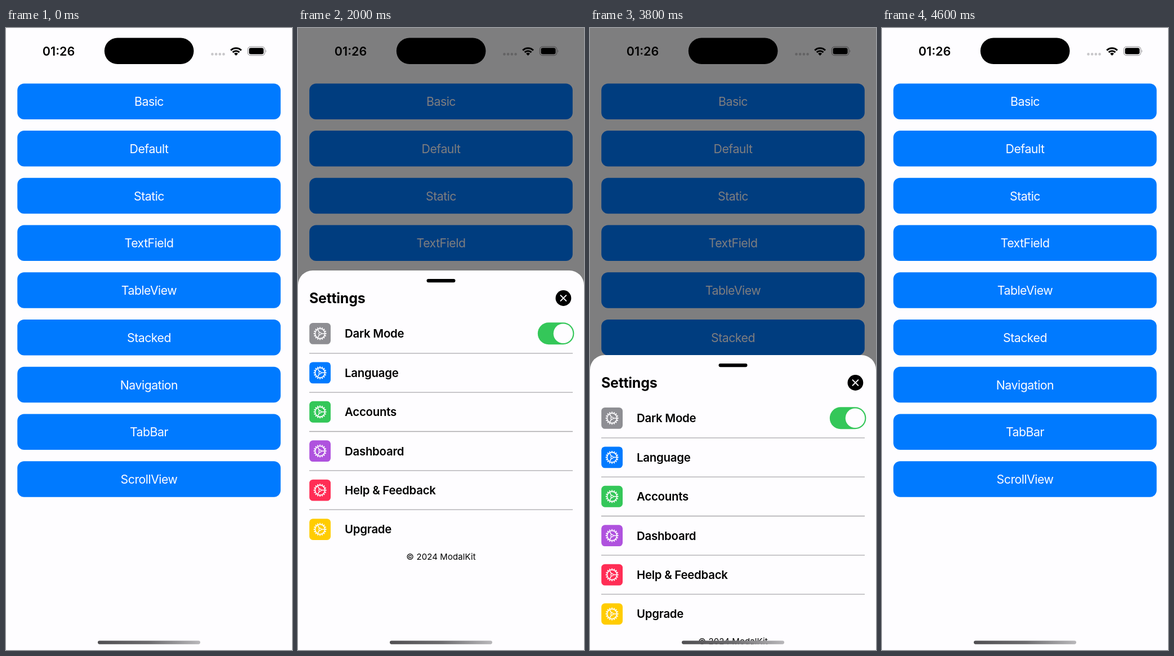
Recreate the animation shown at these times as an HTML page. Size 508 by 1103 pixels, loop 4.7 s.

```html
<!DOCTYPE html>
<html lang="en">
<head>
<meta charset="utf-8">
<title>Settings sheet</title>
<style>
html, body { margin: 0; width: 100%; height: 100%; overflow: hidden; background: #fefdff; }
svg { display: block; width: 508px; height: 1103px; font-family: Inter, "Open Sans", sans-serif; }
.button { font-size: 21.3px; letter-spacing: -.5px; fill: #fefdff; text-anchor: middle; }
.clock { font-size: 21.5px; font-weight: 600; text-anchor: middle; }
.title { font-size: 25px; font-weight: 700; letter-spacing: -.25px; }
.row { font-size: 20.4px; font-weight: 600; letter-spacing: -.25px; }
.footer { font-size: 15px; letter-spacing: .1px; text-anchor: middle; }
</style>
</head>
<body>
<svg viewBox="0 0 508 1103">
  <defs>
    <linearGradient id="bar">
      <stop offset="0" stop-color="#504f52"/>
      <stop offset=".5" stop-color="#6c6b6e"/>
      <stop offset="1" stop-color="#b9b8bb"/>
    </linearGradient>
    <g id="gear" fill="none" stroke="#fefdff">
      <circle r="8.7" stroke-width="1.7"/>
      <circle r="10.3" stroke-width="2.2" pathLength="160" stroke-dasharray="5 5" stroke-dashoffset="2.5"/>
      <circle r="2.1" stroke-width="1.3"/>
      <path id="spokes" stroke-width="1.5"/>
    </g>
  </defs>

  <rect width="508" height="1103" fill="#fefdff"/>
  <g id="buttons"></g>

  <text class="clock" x="93.5" y="48.8">01:26</text>
  <g id="dots" fill="#c8c7ca"></g>
  <g id="wifi" fill="none" stroke="#000" stroke-width="3.1"></g>
  <rect x="429.4" y="33.2" width="30.4" height="15.4" rx="5" fill="none" stroke="#a09fa2" stroke-width="1.2"/>
  <rect x="431.6" y="35.3" width="26" height="11.2" rx="3.2"/>
  <path d="M461.3 38.4q2.3 2.5 0 5z" fill="#a09fa2"/>

  <rect id="dim" width="508" height="1103" opacity="0"/>
  <rect x="174.8" y="17.5" width="158.7" height="46.5" rx="23.2"/>

  <g id="sheet">
    <path d="M0 1103V26A26 26 0 0 1 26 0H482A26 26 0 0 1 508 26V1103z" fill="#fefdff"/>
    <rect x="228.5" y="15" width="51" height="6.2" rx="3.1"/>
    <text class="title" x="20" y="57.6">Settings</text>
    <circle cx="471.4" cy="49" r="13.9"/>
    <path d="M466.5 44.1l9.8 9.8m0-9.8l-9.8 9.8" stroke="#fefdff" stroke-width="2" stroke-linecap="round"/>
    <g id="rows"></g>
    <rect x="425.8" y="92.3" width="64.6" height="38.9" rx="19.4" fill="#34c759"/>
    <circle cx="471" cy="111.8" r="17.3" fill="#fefdff"/>
    <text class="footer" x="254" y="512.6">© 2024 ModalKit</text>
  </g>
  <rect x="163" y="1086.5" width="182" height="6.2" rx="3.1" fill="url(#bar)"/>
</svg>

<script>
const $ = id => document.getElementById(id);
const LOOP = 4700, STEP = 100;
const HIDDEN = 1103, REST = 559, DIM = .5;

function polar(r, deg) {
  const a = deg * Math.PI / 180;
  return `${(r * Math.cos(a)).toFixed(2)} ${(r * Math.sin(a)).toFixed(2)}`;
}

function build() {
  const labels = ['Basic', 'Default', 'Static', 'TextField', 'TableView',
    'Stacked', 'Navigation', 'TabBar', 'ScrollView'];
  $('buttons').innerHTML = labels.map((label, i) => {
    const y = 98.4 + i * 83.72;
    return `<rect x="20.2" y="${y}" width="467.6" height="63.5" rx="12" fill="#007aff"/>
      <text class="button" x="254" y="${y + 39.9}">${label}</text>`;
  }).join('');

  $('spokes').setAttribute('d',
    [0, 120, 240].map(a => `M${polar(2.5, a)}L${polar(8.5, a)}`).join(''));

  $('dots').innerHTML = [0, 1, 2, 3]
    .map(i => `<circle cx="${366.5 + i * 6.7}" cy="46.4" r="2.3"/>`).join('');

  const arc = r => `<path d="M${polar(r, -135)}A${r} ${r} 0 0 1 ${polar(r, -45)}"/>`;
  $('wifi').setAttribute('transform', 'translate(408.6 49)');
  $('wifi').innerHTML = arc(13.2) + arc(8.3) +
    `<path d="M0 0L${polar(4.9, -135)}A4.9 4.9 0 0 1 ${polar(4.9, -45)}z" fill="#000" stroke="none"/>`;

  const rows = [['Dark Mode', '#8e8e93'], ['Language', '#007aff'], ['Accounts', '#34c759'],
    ['Dashboard', '#af52de'], ['Help &amp; Feedback', '#ff2d55'], ['Upgrade', '#ffcc00']];
  $('rows').innerHTML = rows.map(([label, color], i) => {
    const y = 111.9 + i * 69.43;
    const line = i < rows.length - 1
      ? `<path d="M20 ${146.8 + i * 69.35}H488" stroke="#a9a8ab" stroke-width="1.3"/>` : '';
    return `<rect x="20.2" y="${y - 18.9}" width="37.8" height="37.8" rx="6.3" fill="${color}"/>
      <use href="#gear" x="39.1" y="${y}"/>
      <text class="row" x="83" y="${y + 7.4}">${label}</text>${line}`;
  }).join('');
}

// Share of the way left in a critically damped spring released at t0
function spring(t, t0) {
  const u = Math.max(0, t - t0) * .0165;
  return (1 + u) * Math.exp(-u);
}

// Finger position, sampled every STEP from t0
function drag(t, t0, tops) {
  const p = (t - t0) / STEP, i = Math.min(Math.floor(p), tops.length - 2);
  return tops[i] + (tops[i + 1] - tops[i]) * (p - i);
}

function pose(t) {
  if (t < 600 || t >= 4600) return [HIDDEN, 0];
  if (t < 1900) {
    const left = spring(t, 531);
    return [REST + (HIDDEN - REST) * left, DIM * (1 - left)];
  }
  if (t < 2500) return [drag(t, 1900, [540, 430, 255, 105, 38, 128]), DIM];
  if (t < 3800) return [REST - 521 * spring(t, 2313), DIM];
  if (t <= 4100) return [drag(t, 3800, [580, 690, 850, 968]), DIM];
  const left = spring(t, 4150);
  return [HIDDEN - 135 * left, DIM * left];
}

function draw(time) {
  const t = Math.floor(time % LOOP / STEP) * STEP;
  const [top, dim] = pose(t);
  $('sheet').setAttribute('transform', `translate(0 ${top.toFixed(2)})`);
  $('dim').setAttribute('opacity', dim.toFixed(3));
}

build();
draw(0);
let start;
requestAnimationFrame(function tick(now) {
  start ??= now;
  draw(now - start);
  requestAnimationFrame(tick);
});
</script>
</body>
</html>
```
